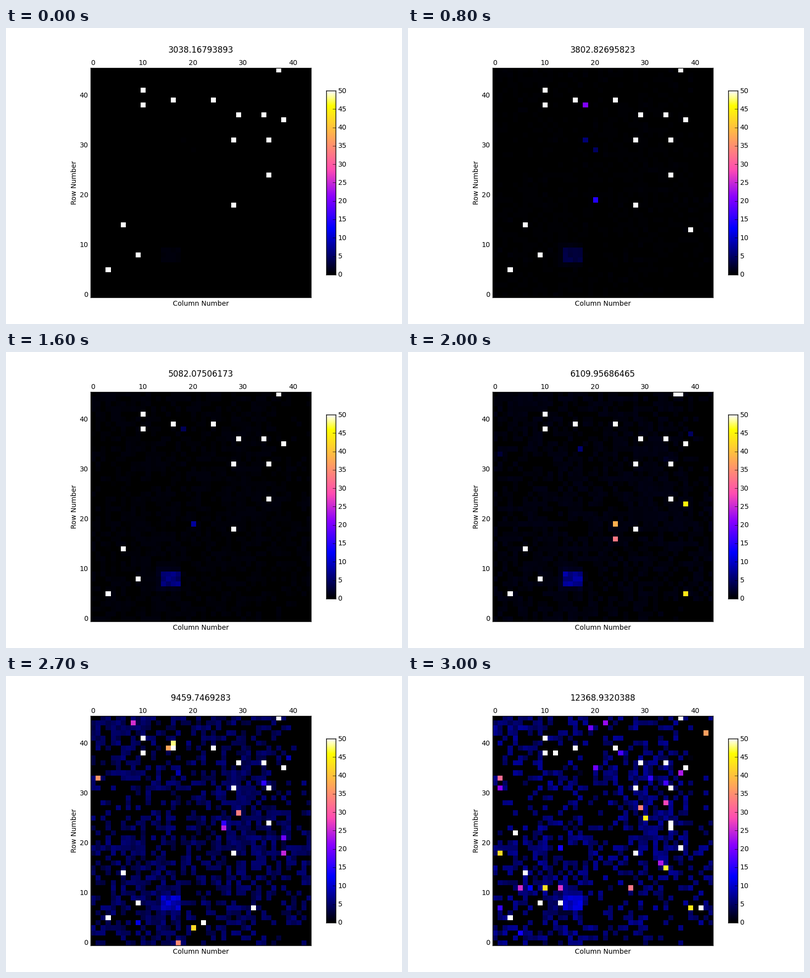
Recreate the animation shown at these times as a matplotlib script. Size 800 by 600 pixels, loop 3.1 s.

```python
import numpy as np
import matplotlib.pyplot as plt
from matplotlib.animation import FuncAnimation

W, H, DPI = 800, 600, 100
FRAMES, STEP = 31, 100
COLS, ROWS = 44, 46
LEFT, TOP, CELL = 171, 80.8, 10.12
BAR_X, BAR_TOP, BAR_W, BAR_H = 647.2, 127.1, 18.7, 372.7
VMAX = 50

plt.rcParams.update({"font.family": "DejaVu Sans", "font.size": 10,
                     "axes.linewidth": 1.0})

# The heading falls out of a nearly linear sweep of its inverse.
KEYS = [0, 4, 11, 20, 24, 27, 30]
READINGS = np.array([3038.16793893, 3377.75384543, 4199.18233457,
                     6109.95686465, 7659.56934921, 9459.7469283,
                     12368.9320388])
BEND = 3.41e-11
SWEEP = np.sqrt(READINGS ** -2 + BEND)

# Saturated cells as (column, row).
STUCK = [(37, 45), (10, 41), (10, 38), (16, 39), (24, 39), (29, 36),
         (34, 36), (38, 35), (28, 31), (35, 31), (35, 24), (28, 18),
         (6, 14), (9, 8), (3, 5)]

# Cells that swell and fade: column, row, peak time, height, width.
SWELLS = [(18, 38, 10, 25, 4.5), (20, 19, 11, 21, 5), (18, 31, 9, 6, 5),
          (20, 29, 9, 5, 5), (39, 35, 4, 15, 1), (39, 37, 24, 18, 3.5),
          (17, 34, 24, 15, 4), (1, 33, 28, 37, 5), (34, 32, 29, 17, 6)]

row, col = np.mgrid[0:ROWS, 0:COLS]


def bump(cx, cy, sx, sy, height):
    return height * np.exp(-((col - cx) / sx) ** 2 - ((row - cy) / sy) ** 2)


# Where the background is busy (positive) or quiet (negative).
DENSITY = (bump(4, 45, 6, 4, .9) + bump(7, 39, 3, 4, .5)
           + bump(9, 15, 6, 8, .7) + bump(15, 6, 4, 9, .9)
           + bump(30, 30, 6, 9, .8) + bump(33, 19, 8, 5, .5)
           + bump(42, 38, 5, 9, -1.4) + bump(18, 40, 6, 6, -.5)
           + bump(21, 8, 4, 8, -.6) + bump(42, 1, 7, 3, -2)
           + bump(3, 29, 4, 6, -.5) + bump(3, 9, 4, 4, -.3))
FIXED = np.random.default_rng(11).normal(size=(ROWS, COLS))

inner = (abs(col - 15.5) < 2) & (abs(row - 8) < 2)
ring = (abs(col - 15) < 3) & (abs(row - 8) < 3) & ~inner


def reading(n):
    return 1 / np.sqrt(np.interp(n, KEYS, SWEEP) ** 2 - BEND)


def level(n):
    return .1 + .03 * n + 5.6 / (1 + np.exp((25.3 - n) / 1.7))


def cutoff(n):
    return (.008 if n > 21 else .0038) * (n - 21) ** 2 - .15


def counts(n):
    rng = np.random.default_rng([5, n])
    noise = .8 * FIXED + .6 * rng.normal(size=FIXED.shape) + DENSITY
    spread = rng.uniform(.6, 1.2, FIXED.shape)
    grid = np.where(noise > cutoff(n), level(n) * spread, 0)

    patch = (.7 + .35 * n) * rng.uniform(.7, 1.1, FIXED.shape)
    grid = np.where(inner, patch, grid)
    grid = np.where(ring, np.maximum(grid, patch * .22), grid)

    for c, r, peak, height, width in SWELLS:
        swell = height * np.exp(-((n - peak) / width) ** 2)
        grid[r, c] = max(grid[r, c], swell)

    # Stray flashes become frequent towards the end.
    for _ in range(rng.poisson(.03 * n + 33 * (n / 30) ** 8)):
        r, c = rng.integers(ROWS), rng.integers(COLS)
        grid[r, c] = 10 + rng.exponential(24)

    for c, r in STUCK:
        grid[r, c] = VMAX
    return grid


fig = plt.figure(figsize=(W / DPI, H / DPI), dpi=DPI, facecolor="white")


def panel(x, y, w, h, data):
    ax = fig.add_axes([x / W, 1 - (y + h) / H, w / W, h / H])
    image = ax.imshow(data, cmap="gnuplot2", vmin=0, vmax=VMAX, aspect="auto",
                      origin="lower", interpolation="nearest")
    ax.set_xticks([])
    ax.set_yticks([])
    return ax, image


def label(x, y, text, **style):
    style = {"ha": "center", "va": "baseline", **style}
    return fig.text(x / W, 1 - y / H, text, **style)


_, image = panel(LEFT, TOP, COLS * CELL, ROWS * CELL, counts(0))
bar, _ = panel(BAR_X, BAR_TOP, BAR_W, BAR_H,
               np.linspace(0, VMAX, 256)[:, None])

bottom = TOP + ROWS * CELL
middle = LEFT + COLS * CELL / 2 - .5
for tick in range(0, 50, 10):
    offset = (tick + .5) * CELL
    label(LEFT + offset - .6, 75, str(tick))
    label(166, bottom - offset + 4.2, str(tick), ha="right")
for tick in range(0, VMAX + 1, 5):
    height = tick / VMAX
    label(670.5, BAR_TOP + BAR_H * (1 - height) + 4.4, str(tick), ha="left")
    bar.plot([1 - 5.5 / BAR_W, 1], [height, height], color="black", lw=.5,
             transform=bar.transAxes)

label(middle, 563, "Column Number")
label(142, (TOP + bottom) / 2, "Row Number", rotation=90,
      rotation_mode="anchor")
title = label(middle, 50, "", fontsize=12)


def update(n):
    image.set_data(counts(n))
    title.set_text(f"{reading(n):.12g}")
    return image, title


anim = FuncAnimation(fig, update, frames=FRAMES, interval=STEP, repeat=True,
                     repeat_delay=0, blit=False)
plt.show()
```
